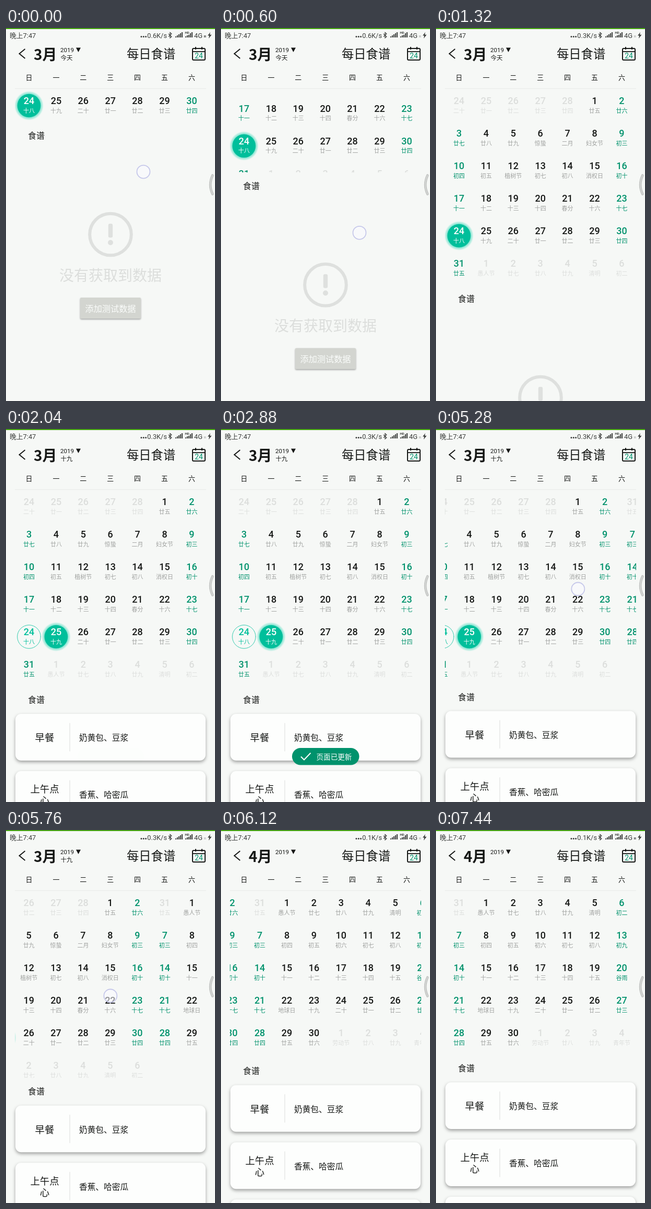
Animation, 400 px wide and 711 px high, one loop 8 s. Source, as an HTML page with a canvas:

```html
<!DOCTYPE html>
<html lang="zh-CN">
<head>
<meta charset="utf-8">
<style>
html, body { margin: 0; width: 100%; height: 100%; overflow: hidden; background: #f6f8f6; }
canvas { display: block; }
</style>
</head>
<body>
<canvas id="stage" width="400" height="711"></canvas>
<script>
const ctx = document.getElementById('stage').getContext('2d');
const LOOP = 8000;
const FONT = 'Roboto, "Noto Sans CJK SC", "Noto Sans CJK", sans-serif';
const CJK = '"Noto Sans CJK SC", "Noto Sans CJK", sans-serif';
const BG = '#f6f8f6', INK = '#161816', GREEN = '#00926c', TEAL = '#00bf9b', FAINT = '#dcdedc', MUTED = '#a0a2a0';
const COL = 51.9, ROW = 62, PAGE = 364;
const MONTHS = [
  { first: 0, rows: 6, from: 5, to: 35 },
  { first: 35, rows: 5, from: 36, to: 65 }
];
// Days are counted from 24 February.
const HOLIDAYS = {
  10: '惊蛰', 11: '二月', 12: '妇女节', 16: '植树节', 19: '消权日', 25: '春分',
  36: '愚人节', 40: '清明', 55: '谷雨', 57: '地球日', 66: '劳动节', 69: '青年节'
};
const TODAY = 28;

const clamp01 = v => Math.min(1, Math.max(0, v));
const mix = (a, b, u) => a + (b - a) * u;
const span = (t, a, b) => clamp01((t - a) / (b - a));
const easeInOut = u => (1 - Math.cos(Math.PI * u)) / 2;
const easeOut = u => 1 - (1 - u) ** 3;

// Evenly timed samples, joined linearly.
function track(t, start, step, values) {
  const p = Math.min(values.length - 1, Math.max(0, (t - start) / step));
  const i = Math.min(values.length - 2, Math.floor(p));
  return mix(values[i], values[i + 1], p - i);
}
const dragY = t => track(t, 0, 120, [274, 280, 294, 322, 356, 390, 426, 460, 490]);
const swipeX = t => track(t, 4800, 120, [326, 324, 314, 296, 272, 252, 233, 215, 200, 184]);

function expansion(t) {
  const pulled = Math.max(0, dragY(t) - 294);
  return mix(pulled, 311, easeInOut(span(t, 960, 1280))) / 311;
}
function pageShift(t) {
  const pulled = Math.max(0, 304 - swipeX(t));
  return mix(pulled, PAGE, easeOut(span(t, 5880, 6360)));
}

// Text is centred vertically on y.
function text(s, x, y, size, color, { align = 'center', weight = 400, family = FONT } = {}) {
  ctx.font = `${weight} ${size}px ${family}`;
  ctx.textAlign = align;
  ctx.fillStyle = color;
  ctx.fillText(s, x, y + size * (/[\u4e00-\u9fff]/.test(s) ? 0.38 : 0.356));
}
function line(points, color, width, cap = 'butt') {
  ctx.beginPath();
  points.forEach(([x, y]) => ctx.lineTo(x, y));
  ctx.strokeStyle = color;
  ctx.lineWidth = width;
  ctx.lineCap = cap;
  ctx.stroke();
}
function rect(x, y, w, h, color) {
  ctx.fillStyle = color;
  ctx.fillRect(x, y, w, h);
}
function disc(x, y, r, fill, stroke, width = 1) {
  ctx.beginPath();
  ctx.arc(x, y, r, 0, Math.PI * 2);
  if (fill) { ctx.fillStyle = fill; ctx.fill(); }
  if (stroke) { ctx.strokeStyle = stroke; ctx.lineWidth = width; ctx.stroke(); }
}
function box(x, y, w, h, r, fill) {
  ctx.beginPath();
  ctx.roundRect(x, y, w, h, r);
  ctx.fillStyle = fill;
  ctx.fill();
}
function raised(blur, dy, alpha, draw) {
  ctx.save();
  ctx.shadowColor = `rgba(0,0,0,${alpha})`;
  ctx.shadowBlur = blur;
  ctx.shadowOffsetY = dy;
  draw();
  ctx.restore();
}

function dayOfMonth(i) {
  if (i < 5) return 24 + i;
  if (i < 36) return i - 4;
  return i < 66 ? i - 35 : i - 65;
}
function lunar(i) {
  if (HOLIDAYS[i]) return HOLIDAYS[i];
  let d = i + 20;
  if (d > 30) d -= 30;
  if (i > 39) d -= 29;
  const digits = '一二三四五六七八九十';
  if (d === 20) return '二十';
  if (d === 30) return '三十';
  return '初十廿'[Math.floor((d - (d <= 10 ? 1 : 0)) / 10)] + digits[(d - 1) % 10];
}

function drawDay(i, x, y, month, selected) {
  const inMonth = i >= month.from && i <= month.to;
  const weekend = i % 7 === 0 || i % 7 === 6;
  let number = inMonth ? (weekend ? GREEN : INK) : FAINT;
  let label = inMonth ? (weekend ? GREEN : MUTED) : FAINT;
  if (i === selected) {
    const glow = ctx.createRadialGradient(x, y + 9, 21, x, y + 9, 28);
    glow.addColorStop(0, 'rgba(0,205,165,.6)');
    glow.addColorStop(1, 'rgba(0,205,165,0)');
    disc(x, y + 9, 28, glow);
    disc(x, y + 9, 22.3, TEAL);
    number = label = '#fff';
  } else if (i === TODAY) {
    disc(x, y + 9, 22.3, null, TEAL, 0.8);
    number = label = TEAL;
  }
  text(dayOfMonth(i), x, y, 18, number, { weight: 500 });
  text(lunar(i), x, y + 18.5, 11, label);
}

function drawCalendar(t, bottom, shift) {
  const scroll = -248 * (1 - expansion(t));
  const selected = t < 1780 ? TODAY : TODAY + 1;
  ctx.save();
  ctx.beginPath();
  ctx.rect(17, 116, 366, bottom - 116);
  ctx.clip();
  MONTHS.forEach((month, m) => {
    for (let k = 0; k < month.rows * 7; k++) {
      const x = 44 + (k % 7) * COL + m * PAGE - shift;
      const y = 139 + Math.floor(k / 7) * ROW + scroll;
      // The April page repeats no March selection.
      if (x > -15 && x < 415) drawDay(month.first + k, x, y, month, m ? -1 : selected);
    }
  });
  ctx.restore();
}

function drawStatus(t) {
  const grey = '#3a3c3a';
  rect(0, 0, 400, 2, '#43a30c');
  text('晚上7:47', 7, 14, 12.8, grey, { align: 'left' });
  const speed = t < 1100 ? '0.6K/s' : t < 6000 ? '0.3K/s' : '0.1K/s';
  text(speed, 308, 14, 12.8, grey, { align: 'right' });
  for (let i = 0; i < 3; i++) disc(259 + i * 4.3, 16.5, 1.5, grey);
  line([[311, 11], [317, 16.5], [314, 19], [314, 8.5], [317, 11], [311, 16.5]], grey, 1.1);
  for (const x of [324, 343])
    for (let i = 0; i < 5; i++) rect(x + i * 3, 16 - i * 2, 2, 2 + i * 2, grey);
  rect(342, 6, 9, 7, BG);
  text('HD', 346.5, 9, 6, grey, { weight: 700 });
  text('4G', 360, 14, 13, grey, { align: 'left' });
  const net = t < 480 || t >= 7440 ? grey : '#b4b6b4';
  rect(379, 14, 1.2, 4, net);
  rect(381.3, 14, 1.2, 4, net);
  ctx.beginPath();
  [[391, 8], [386, 14.5], [389, 14.5], [388, 20], [393.5, 12.8], [390, 12.8]].forEach(p => ctx.lineTo(...p));
  ctx.fillStyle = grey;
  ctx.fill();
}

function drawHeader(t) {
  const april = t >= 5900;
  line([[36.5, 40], [25.5, 49], [36.5, 58]], INK, 2);
  text(april ? '4月' : '3月', 53, 50, 28, INK, { align: 'left', weight: 700, family: CJK });
  text('2019', 104, 42, 11.6, INK, { align: 'left' });
  ctx.beginPath();
  [[134, 37.5], [143, 37.5], [138.5, 46]].forEach(p => ctx.lineTo(...p));
  ctx.fill();
  if (!april) text(t < 1780 ? '今天' : '十九', 104.5, 57, 11.5, INK, { align: 'left' });
  text('每日食谱', 231, 49.5, 23.3, INK, { align: 'left' });
  ctx.beginPath();
  ctx.roundRect(357, 39, 24, 22, 2);
  ctx.strokeStyle = INK;
  ctx.lineWidth = 2;
  ctx.stroke();
  line([[357, 45], [381, 45]], INK, 1.8);
  for (const x of [363, 375]) line([[x, 36], [x, 41]], INK, 2);
  text('24', 369, 53.5, 14, GREEN);
  [...'日一二三四五六'].forEach((d, i) => text(d, 44 + i * COL, 94, 13, INK));
  rect(17, 115, 366, 1, '#e9ebe9');
}

function drawEmpty(dy) {
  ctx.save();
  ctx.translate(0, dy);
  disc(200, 393.5, 39.8, null, '#dee0de', 6);
  ctx.beginPath();
  ctx.roundRect(195.8, 373, 8.4, 26.5, 3);
  ctx.fillStyle = '#dee0de';
  ctx.fill();
  disc(200, 409, 5, '#dee0de');
  text('没有获取到数据', 200, 471.5, 28, FAINT);
  raised(3, 1.5, 0.35, () => box(142, 514, 116, 40, 2, '#d3d5d0'));
  text('添加测试数据', 200, 534.5, 16.2, '#fafcfa');
  ctx.restore();
}

function drawCards(labelY) {
  const meals = [[['早餐'], '奶黄包、豆浆'], [['上午点', '心'], '香蕉、哈密瓜'], [[], '']];
  meals.forEach(([name, food], i) => {
    const y = labelY + 27 + i * 109;
    raised(6, 3, 0.36, () => box(18, y, 364, 89, 11, '#fdfefd'));
    rect(121.5, y + 17.5, 1.2, 54, '#e0e2e0');
    name.forEach((s, k) => text(s, 74, y + 45.5 + (k - (name.length - 1) / 2) * 22, 18.4, INK));
    text(food, 140, y + 45.5, 15.7, INK, { align: 'left' });
  });
}

function drawToast(t) {
  const alpha = span(t, 2040, 2360) * (1 - span(t, 4180, 4540));
  if (!alpha) return;
  ctx.save();
  ctx.globalAlpha = alpha;
  box(136, 608, 128.5, 32.5, 16.2, GREEN);
  line([[153, 624.5], [159, 630.5], [171.5, 617.5]], '#fff', 2);
  text('页面已更新', 182.5, 624.5, 13.6, '#fff', { align: 'left' });
  ctx.restore();
}

function drawTouch(t) {
  let p;
  if (t < 960) p = [263 + 2 * span(t, 120, 600), dragY(t)];
  else if (t >= 1680 && t < 1840) p = [98, 393];
  else if (t >= 4800 && t < 5900) p = [swipeX(t), track(t, 4800, 480, [297, 305, 316, 320])];
  if (p) disc(...p, 12.5, 'rgba(250,250,255,.55)', '#c6c8ea', 1.8);
}

function drawHandle() {
  ctx.beginPath();
  ctx.moveTo(395.3, 281);
  ctx.quadraticCurveTo(387, 299, 395.3, 316.5);
  ctx.lineCap = 'round';
  ctx.strokeStyle = '#b6b8b6';
  ctx.lineWidth = 4.6;
  ctx.stroke();
  ctx.strokeStyle = '#d2d4d2';
  ctx.lineWidth = 3;
  ctx.stroke();
}

function draw(t) {
  rect(0, 0, 400, 711, BG);
  const shift = pageShift(t);
  const pulled = 311 * expansion(t);
  const labelY = 205 + pulled - ROW * shift / PAGE;
  drawCalendar(t, labelY - 26, shift);
  drawStatus(t);
  drawHeader(t);
  text('食谱', 42, labelY, 16, INK, { align: 'left' });
  if (t < 1920) drawEmpty(pulled);
  else drawCards(labelY);
  drawToast(t);
  drawTouch(t);
  drawHandle();
}

const began = performance.now();
function frame() {
  draw((performance.now() - began) % LOOP);
  requestAnimationFrame(frame);
}
frame();
</script>
</body>
</html>
```
